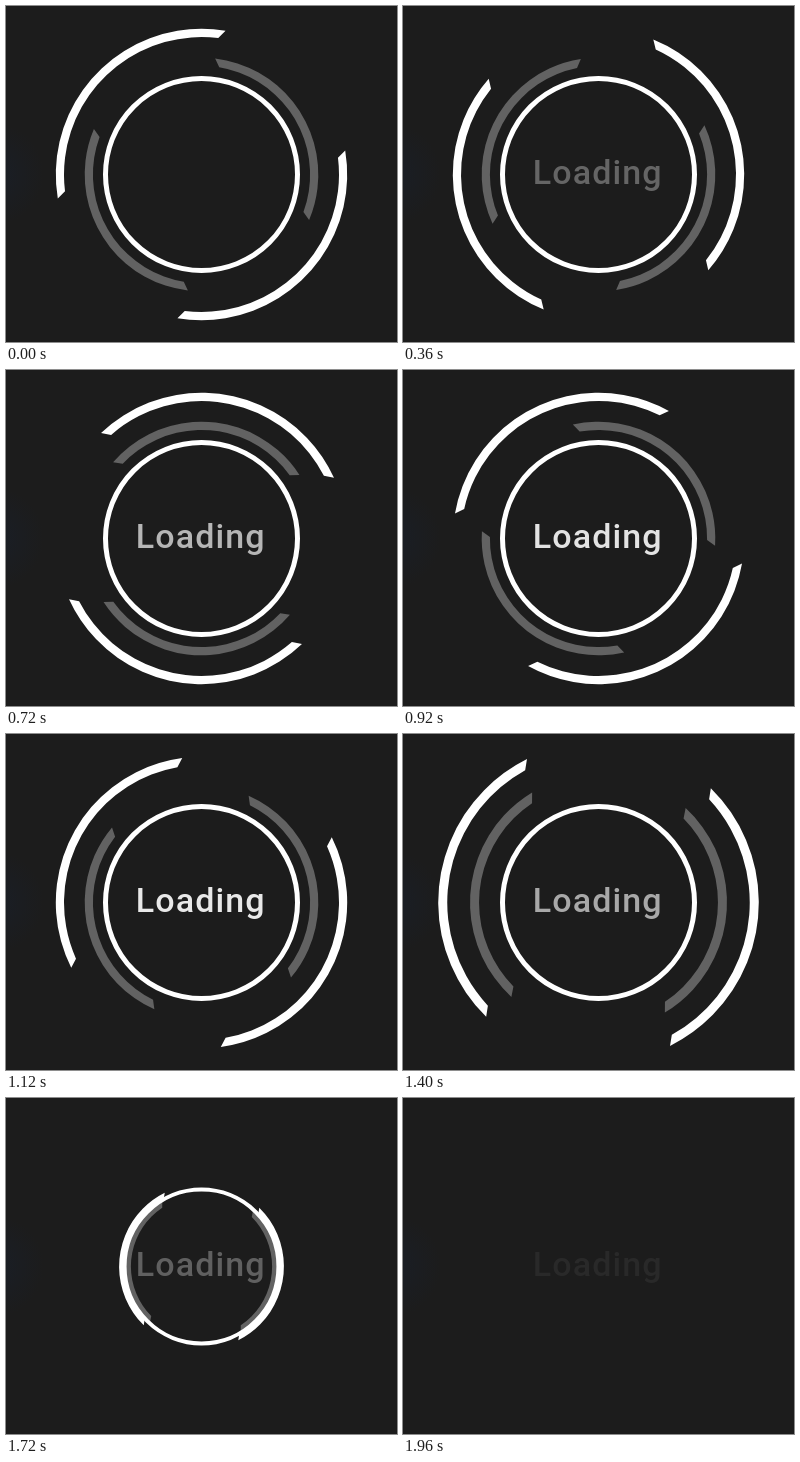
Recreate the animation shown at these times as an HTML page with a canvas. Size 391x336 px, loop 2.04 s.

```html
<!DOCTYPE html>
<html lang="en">
<head>
<meta charset="utf-8">
<title>Loading</title>
<style>
html, body { margin: 0; width: 100%; height: 100%; overflow: hidden; background: #1c1c1c; }
canvas { display: block; }
</style>
</head>
<body>
<canvas id="stage" width="391" height="336"></canvas>
<script>
const ctx = document.getElementById('stage').getContext('2d');
const W = 391, H = 336, CX = 195.5, CY = 168.5;
const LOOP = 2040, STEP = 40, END = 1960;
const RAD = Math.PI / 180;
const clamp = (v, lo, hi) => Math.min(hi, Math.max(lo, v));

const glow = ctx.createRadialGradient(-14, 168, 0, -14, 168, 52);
glow.addColorStop(0, 'rgba(24, 32, 46, 0.6)');
glow.addColorStop(1, 'rgba(24, 32, 46, 0)');

// Shrinks from 1 to 0, all rings vanishing together at END.
function shrink(t, start) {
  return 1 - Math.pow(clamp((t - start) / (END - start), 0, 1), 1.29);
}

function swell(t) {
  return 1 + 0.1 * clamp((t - 1220) / 170, 0, 1);
}

// Two opposite bands whose ends are cut at a slant.
function arcs(ring, turn, scale) {
  if (scale <= 0) return;
  const { outer, inner, half, cut, color } = ring;
  ctx.fillStyle = color;
  for (const side of [0, 180]) {
    const mid = ring.mid + turn + side;
    ctx.beginPath();
    ctx.arc(CX, CY, outer * scale, (mid - half) * RAD, (mid + half) * RAD);
    ctx.arc(CX, CY, inner * scale, (mid + half - cut) * RAD, (mid - half + cut) * RAD, true);
    ctx.fill();
  }
}

function circle(scale) {
  if (scale <= 0) return;
  ctx.strokeStyle = '#fff';
  ctx.lineWidth = 5 * scale;
  ctx.beginPath();
  ctx.arc(CX, CY, 96 * scale, 0, Math.PI * 2);
  ctx.stroke();
}

function label(alpha) {
  ctx.font = '500 34px Roboto, Inter, sans-serif';
  ctx.letterSpacing = '1.1px';
  ctx.fillStyle = `rgba(255, 255, 255, ${alpha})`;
  const box = ctx.measureText('Loading');
  const inkMid = (box.actualBoundingBoxRight - box.actualBoundingBoxLeft) / 2;
  ctx.fillText('Loading', 194.5 - inkMid, 177.5);
}

const white = { outer: 145.7, inner: 137.5, mid: 45, half: 54.5, cut: 2.5, color: '#fff' };
const gray = { outer: 116.8, inner: 108.6, mid: -30.2, half: 53.1, cut: 2.7, color: '#626262' };

function draw(now) {
  const t = clamp(Math.floor((now % LOOP) / STEP) * STEP, STEP, END);
  const n = t / STEP - 1;
  const turn = Math.min(n * 7.3, 216);

  ctx.fillStyle = '#1c1c1c';
  ctx.fillRect(0, 0, W, H);
  ctx.fillStyle = glow;
  ctx.fillRect(0, 0, 40, H);

  arcs(gray, turn, swell(t) * shrink(t, 1480));
  arcs(white, -turn, swell(t) * shrink(t, 1400));
  circle(shrink(t, 1624));
  label(Math.min(n, 49.5 - n) / 25);
  requestAnimationFrame(draw);
}
requestAnimationFrame(draw);
</script>
</body>
</html>
```
